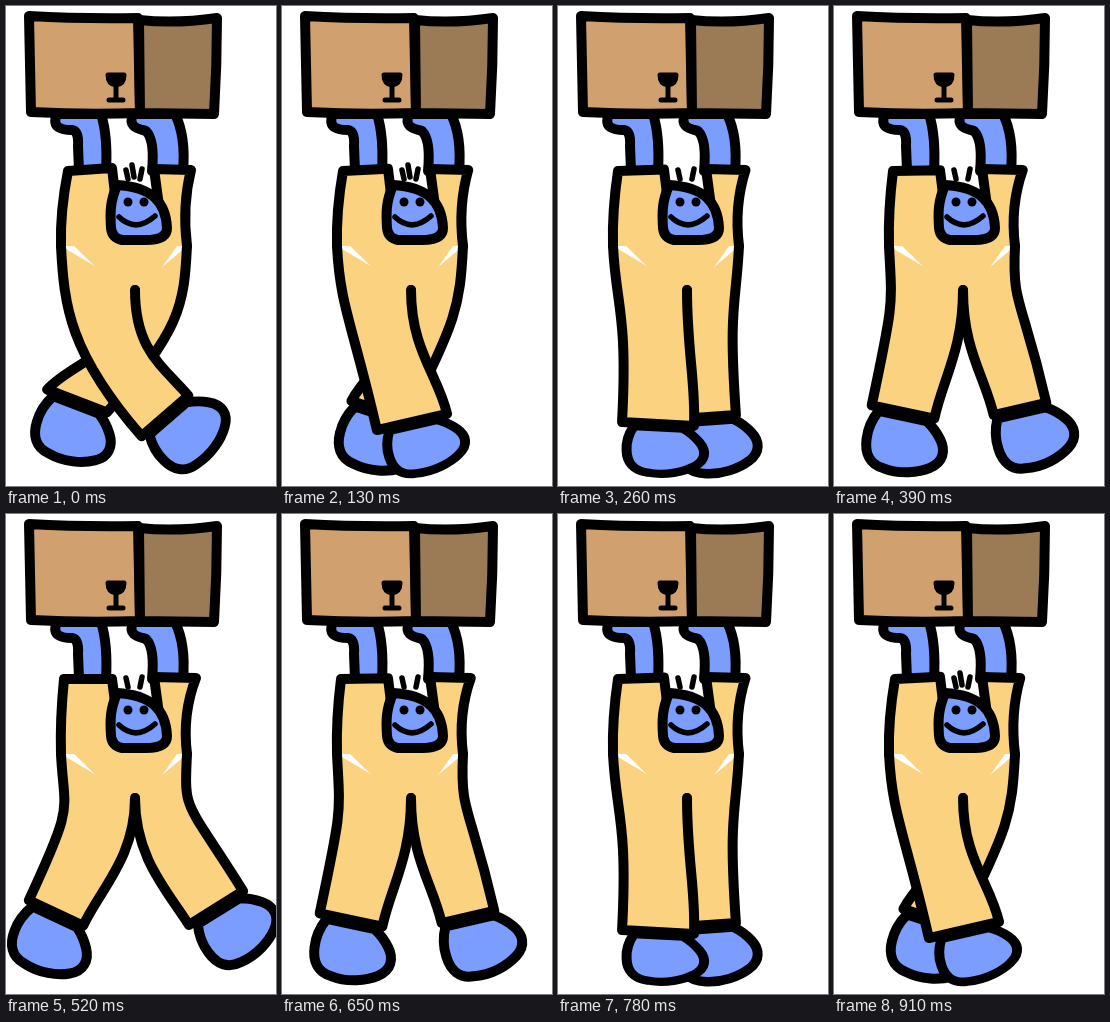
Recreate the animation shown at these times as an HTML page. Size 270 px wide and 480 px high, loop 1040 ms.

```html
<!DOCTYPE html>
<html lang="en">
<head>
<meta charset="utf-8">
<title>Carrying a box</title>
<style>
  html, body { margin: 0; width: 100%; height: 100%; overflow: hidden; background: #fff; }
  svg { display: block; width: 270px; height: 480px; overflow: hidden; }
  path { stroke: #000; stroke-width: 10px; stroke-linecap: round; stroke-linejoin: round; }
  .tan { fill: #d0a06e; }
  .brown { fill: #9b7b55; }
  .blue { fill: #7b9dff; }
  .cloth { fill: #fbd280; }
  .patch { fill: #fbd280; stroke: none; }
  .thin { fill: none; stroke-width: 5.5px; }
  .ink { stroke-width: 5px; }
  #strip { animation: walk 1040ms step-end infinite; }
  @keyframes walk {
    0%, 100% { transform: translateX(0); }
    12.5%, 87.5% { transform: translateX(-270px); }
    25%, 75% { transform: translateX(-540px); }
    37.5%, 62.5% { transform: translateX(-810px); }
    50% { transform: translateX(-1080px); }
  }
</style>
</head>
<body>
<svg viewBox="0 0 270 480"><g id="strip"></g></svg>
<script>
const path = (cls, d) => `<path class="${cls}" d="${d}"/>`;
const move = (x, y, body, turn = 0) =>
  `<g transform="translate(${x} ${y}) rotate(${turn})">${body}</g>`;

// Point at a distance from p, measured along a direction leaning from straight up.
const reach = ([x, y], deg, length) => {
  const a = deg * Math.PI / 180;
  return [x + length * Math.sin(a), y - length * Math.cos(a)];
};

const crotch = [129, 284];

// One trouser leg: hip to hem to crotch. side is -1 for the left hip, 1 for the right.
function leg(side, [x, y, tilt, half, lean = tilt]) {
  const hip = [118 + side * 63, 240];
  const knee = [hip[0] - side * 3, 300];
  const outer = reach([x, y], tilt + 90, side * half);
  const inner = reach([x, y], tilt + 90, -side * half);
  return path('cloth', `M${hip} C${knee} ${reach(outer, lean, 110)} ${outer} L${inner}
    C${reach(inner, lean, 40)} ${[crotch[0], crotch[1] + 60]} ${crotch}`);
}

// The shoe hangs from the hem and flattens when it meets the ground.
function shoe([x, y, tilt]) {
  const h = Math.min(1, (467 - y) / 59);
  const sole = `<g transform="scale(1 ${h})">` + path('blue',
    'M-24 4 C-28 12 -31 24 -30 34 C-29 48 -22 58 -8 59 C10 62 28 56 38 49 C50 41 50 29 42 19 Q35 10 25 4Z') + '</g>';
  return move(x, y, sole, tilt);
}

const torso = u => path('cloth', `M55 240 Q54 205 ${62 - 4 * u} 165 L106 ${162 + 3 * u} L109 188
  V215 H153 V200 L148 163 L${185 + 5 * u} 164 Q176 200 181 240`);

const arms = path('blue', 'M51 108 C45 122 56 124 66 124 Q73 125 72 140 L73 165 H100 Q102 130 95 108Z') +
  path('blue', 'M127 108 C121 122 134 123 140 125 Q149 134 146 165 H177 Q180 130 169 108Z');

const head = path('blue', 'M111 179 C104 196 104 206 105 222 Q106 232 116 234 H140 Q161 234 161 222 C160 196 146 181 111 179Z') +
  '<circle cx="122" cy="196" r="4.5"/><circle cx="138" cy="196" r="4.5"/>' +
  path('thin', 'M113 211 Q130 227 149 210');

const hair = ['M120 164 L122 173', 'M136 163 L134 173', 'M126 159 L128 171'];

const box = path('tan', 'M23 10 Q75 13 132 12 L134 107 Q80 109 25 106Z') +
  path('brown', 'M133 14 Q170 18 211 12 Q211 60 208 108 L134 107Z') +
  move(110, 82, path('ink', 'M-8 -13 H8 Q8 -4 0 -3 Q-8 -4 -8 -13Z') +
    path('ink', 'M0 -3 V12 M-7 12 H7'));

// Hem centre, tilt, half width and, where the leg bends, its lean.
const steps = [
  { front: [159, 410, -41, 31], rear: [71, 395, 21, 32, 42] },
  { front: [130, 416, -13, 36], rear: [97, 404, 18, 29, 27] },
  { front: [100, 418, 3, 36], rear: [150, 411, -4, 28] },
  { front: [69, 406, 12, 32], rear: [186, 403, -13, 27] },
  { front: [50, 399, 25, 30], rear: [210, 394, -32, 32] }
];

const draw = ({ front, rear }, i) => move(i * 270, 0, [
  shoe(rear),
  path('patch', 'M58 230 H178 L129 300Z'),
  leg(1, rear),
  shoe(front),
  leg(-1, front),
  arms,
  torso(i / 4),
  ...hair.slice(0, i < 2 ? 3 : 2).map(d => path('thin', d)),
  head,
  box
].join(''));

document.getElementById('strip').innerHTML = steps.map(draw).join('');
</script>
</body>
</html>
```
